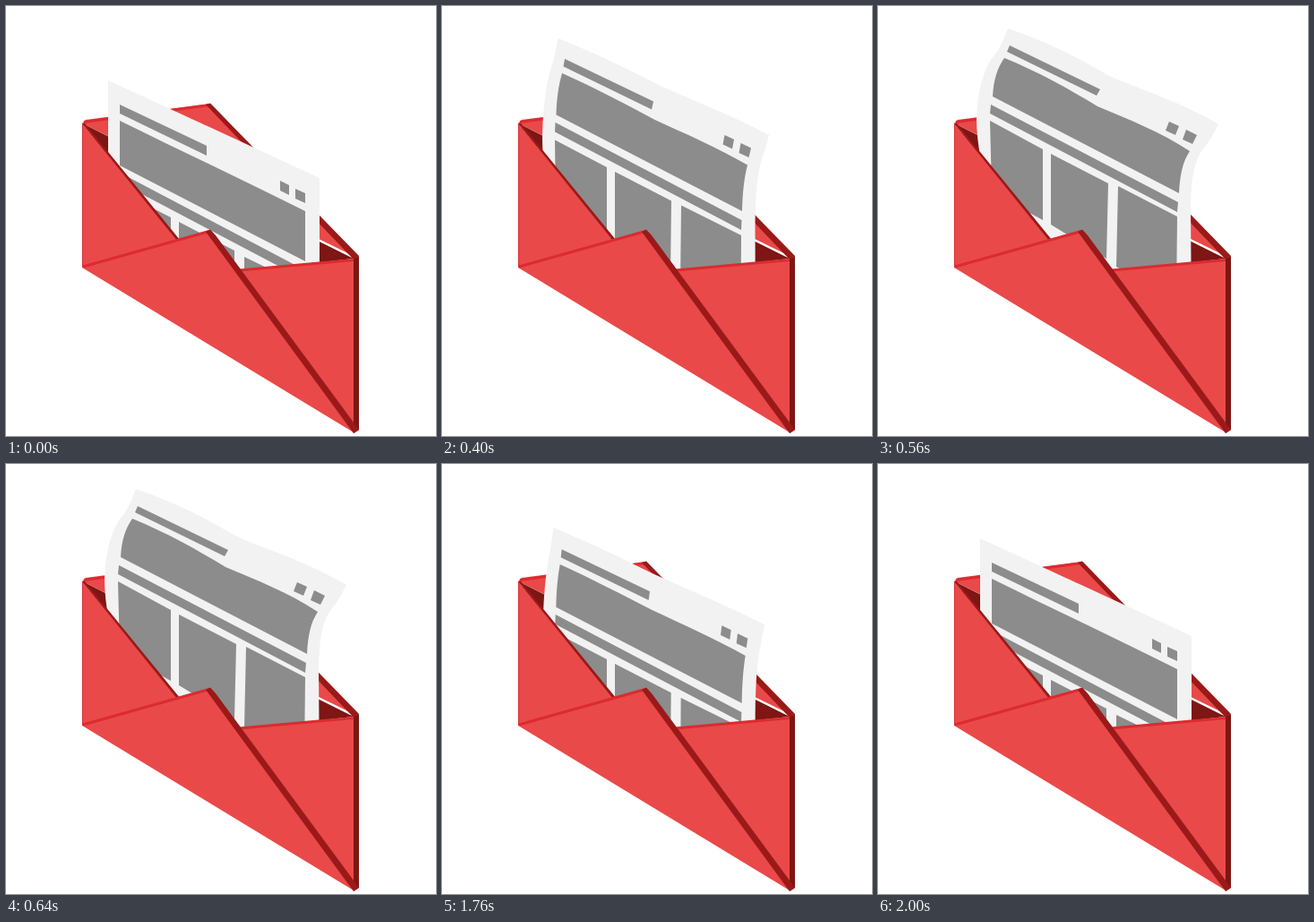
Animation, 480 px wide and 480 px high, one loop 2880 ms. Source, as an HTML page without scripts:

```html
<!DOCTYPE html>
<html lang="en">
<head>
<meta charset="utf-8">
<title>Envelope</title>
<style>
  html, body { margin: 0; width: 100%; height: 100%; overflow: hidden; background: #fff; }
  svg { display: block; width: 100%; height: 100%; }

  .face { fill: #e94949; }
  .edge { fill: #9b1919; }
  .deep { fill: #7d1614; }
  .fold { fill: none; stroke: #db2b30; stroke-width: 3; }

  .letter { animation: slide 2880ms step-end infinite; }
  .letter path { d: var(--flat); animation: bend 2880ms infinite; }

  .sheet {
    fill: #f2f2f2;
    --flat: path("M114 83 C160 104 194 120 227 135 C268 154 309 173 350 192 C350 202 350 211 350 220 C350 242 350 270 350 300 L350 430 L114 300 L114 245 C114 230 114 217 114 203 C114 170 114 140 114 112 C114 102 114 93 114 83Z");
    --bent: path("M145 101 C190 116 225 135 258 154 C295 170 340 184 380 208 C375 218 370 227 364 234 C353 248 350 266 349 300 L350 430 L114 300 L114 245 C112 230 110 217 110 203 C111 170 118 143 133 127 C138 119 141 111 145 101Z");
  }
  .print {
    fill: #8c8c8c;
    --flat: path("M127 110 L224 156 L224 167 L127 120Z M306 195 L316 200 L316 211 L306 206Z M323 204 L334 209 L334 220 L323 215Z M127 128 C162 145 196 162 230 178 C265 195 300 212 334 229 C334 248 334 266 334 285 L127 178 C127 161 127 145 127 128Z M127 186 L334 295 L334 306 L127 197Z M127 207 L184 236 L184 315 L127 284Z M193 241 L255 273 L255 358 L193 320Z M266 280 L334 313 L334 405 L266 367Z");
    --bent: path("M147 120 L248 169 L244 176 L144 127Z M325 205 L336 210 L332 220 L321 215Z M344 214 L356 220 L351 230 L340 225Z M141 134 C180 150 212 168 245 188 C280 203 315 216 348 238 C340 250 337 265 336 285 L128 177 C129 158 133 146 141 134Z M126 186 L335 295 L334 306 L125 196Z M125 204 L184 236 L184 315 L127 284Z M193 241 L257 274 L255 358 L193 320Z M268 277 L334 311 L333 405 L266 367Z");
  }

  @keyframes slide {
    0% { transform: translateY(0); }
    11.11% { transform: translateY(-21px); }
    13.88% { transform: translateY(-56px); }
    16.66% { transform: translateY(-78px); }
    19.44% { transform: translateY(-76px); }
    22.22% { transform: translateY(-73px); }
    58.33% { transform: translateY(-55px); }
    61.11% { transform: translateY(-18px); }
    63.88% { transform: translateY(7px); }
    66.66% { transform: translateY(3px); }
    69.44%, 100% { transform: translateY(0); }
  }
  /* The sheet curls in two jumps and flattens in three. */
  @keyframes bend {
    0% { d: var(--flat); }
    13.88% { d: var(--flat); animation-timing-function: steps(2, jump-start); }
    19.44% { d: var(--bent); }
    58.33% { d: var(--bent); animation-timing-function: steps(3, jump-start); }
    66.66%, 100% { d: var(--flat); }
  }
</style>
</head>
<body>
<svg viewBox="0 0 480 480">
  <g id="back">
    <path class="face" d="M85 131 L89 127 L228 109 L392 281Z"/>
    <path class="fold" d="M87 129.5 L228 110.5"/>
    <path class="edge" d="M223 110 L228 108.5 L394 279 L388 283Z"/>
    <path class="deep" d="M85 131 L388 282 L262 296 L227 253 L193 263Z"/>
  </g>

  <g class="letter">
    <path class="sheet"/>
    <path class="print"/>
  </g>

  <g id="front">
    <path class="deep" d="M387 283 L394 279 L394 473 L388 477Z"/>
    <path class="face" d="M261 294 L388 283 L388 476Z"/>
    <path class="fold" d="M261 295 L388 283.5"/>
    <path class="face" d="M85 131 L193 261 L85 292Z"/>
    <path class="edge" d="M85 131 L88 131 L194 261 L191 262Z"/>
    <path class="fold" style="stroke-width:1" d="M85.5 132 V292"/>
    <path class="face" d="M85 292 L227 250 L388 476Z"/>
    <path class="fold" d="M86 291 L227 251.5"/>
    <path class="edge" d="M223 252 L228 249.5 L234 256 L394 473 L388 477Z"/>
  </g>
</svg>
</body>
</html>
```
